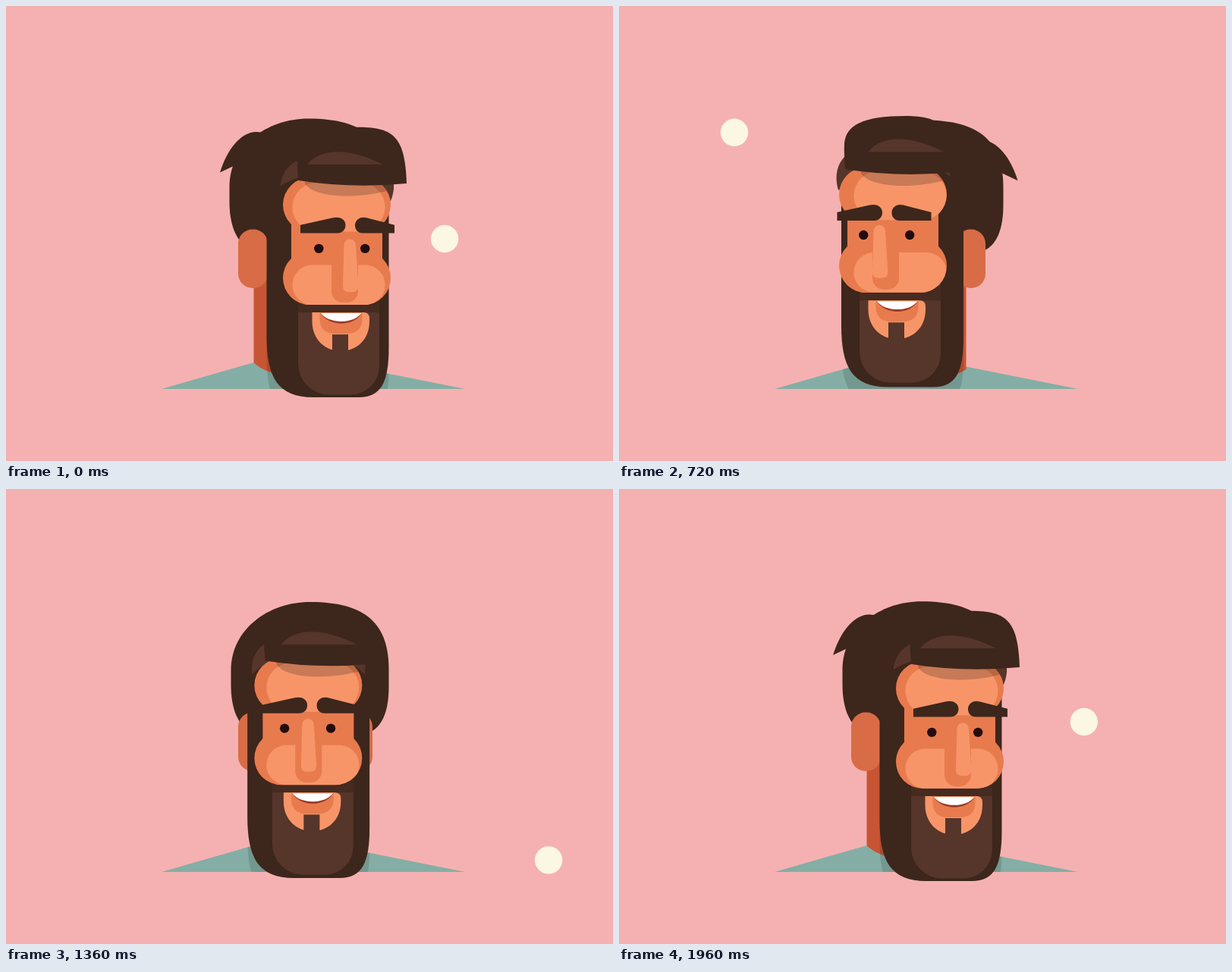
An HTML page with a canvas for the animation above (2 s loop, 800 px wide and 600 px high).

```html
<!DOCTYPE html>
<html lang="en">
<head>
<meta charset="utf-8">
<title>Turning head</title>
<style>
html, body { margin: 0; width: 100%; height: 100%; overflow: hidden; background: #f5b1b1; }
canvas { display: block; width: 100vw; height: 100vh; }
</style>
</head>
<body>
<canvas id="stage" width="800" height="600"></canvas>
<script>
const ctx = document.getElementById('stage').getContext('2d');
const LOOP = 2000, STEP = 40, LAG = 82, WRAP = 235;

const C = {
  bg: '#f5b1b1', shirt: '#84aea5', neck: '#c75534', ear: '#d86c46',
  hair: '#3d261c', hairLight: '#56352a', moustache: '#452b20',
  skin: '#e87b4d', glow: '#f79569', mouth: '#9b3b25', eye: '#230b0e', ball: '#fbf7e3'
};

// Keys are [time, value, bend]; bend delays the start of the segment.
const ballX = [[1163, 152], [1395, 752], [1937, 613.5], [1954, 613.5], [2225, 152]];
const ballY = [[240, 307], [1160, 43.7], [1395, 526.5, 0.3], [1937, 307, 0.3]];
const turnKeys = [[1160, 1], [1395, 0.01], [1937, 0], [1954, 0], [2225, 1]];
const nodKeys = [[240, 0], [1160, -44.2], [1395, 35.5], [1937, 0]];

function track(keys, time) {
  const t = (time - WRAP + LOOP) % LOOP + WRAP;
  if (t <= keys[0][0]) return keys[0][1];
  for (let i = 1; i < keys.length; i++) {
    const [a, from] = keys[i - 1], [b, to, bend = 0] = keys[i];
    if (t < b) {
      const u = (t - a) / (b - a);
      const e = u * u * (3 - 2 * u);
      return from + (to - from) * (e - bend * e * (1 - e));
    }
  }
  return keys[keys.length - 1][1];
}

const fill = (color, path) => { ctx.fillStyle = color; ctx.fill(path); };
const svg = d => new Path2D(d);
function box(x1, y1, x2, y2, r = 0) {
  const p = new Path2D();
  p.roundRect(x1, y1, x2 - x1, y2 - y1, r);
  return p;
}
function disc(x, y, r) {
  const p = new Path2D();
  p.arc(x, y, r, 0, 7);
  return p;
}

const shirt = svg('M205 505 L326.5 470 L457.5 475.5 L605 505 Z');
const neck = svg('M326.5 340 H457.5 V479 C447 487 425 491.5 402 491.5 C365 491.5 338 482 326.5 470 Z');
const ears = [box(306, 294.5, 345, 372, 19), box(444.5, 294.5, 483, 372, 19)];
const tuft = svg('M282 219.5 C291 190 309 166 330 166 Q346 166 354 176 L340 192 Z');
const backHair = svg('M296 238 C296 185 345 148.5 400 148.5 C475 148.5 504 178 504 238 V260 ' +
  'C504 293 495 312 480 320 H322 C303 310 296 285 296 258 Z');
const hairline = svg('M364 256 C359 240 359 212 392 200 L505 215 L511 234 Q512 245 507 257 Z');
const beard = svg('M343.5 266 A80.5 45 0 0 1 504.5 266 V450 C504.5 495 495 516 465 516 H405 ' +
  'C358 516 343.5 490 343.5 435 Z');
const chin = box(385, 375, 492, 512.5, [0, 0, 38, 41]);
const forehead = box(365, 226, 507, 298, 36);
const foreheadGlow = box(377.5, 233, 499.5, 297.3, 32);
const quiffShade = svg('M394 234 C405 253 465 256 512 241 V220 H394 Z');
const face = box(376, 270, 496, 350);
const cheeks = box(365, 323, 507, 394, 35.5);
const cheekGlow = box(377.5, 341.5, 499.5, 394, 26);
const noseShade = box(429, 330, 464, 391, [0, 0, 15, 15]);
const noseGlow = svg('M445.5 315 A7.7 7.7 0 0 1 461 315 L464.3 368 Q464.5 377 456 377 H452 Q443.7 377 444 368 Z');
const goatee = svg('M403.5 404 H471 Q479 404 479 412 V416 C479 440 462 455 441 455 C420 455 403.5 439 403.5 416 Z');
const lip = svg('M413.5 404 H469.5 V412 Q469.5 432 449 432 H434 Q413.5 432 413.5 412 Z');
const mouth = svg('M415 405 H468.5 C464 414 453 418.7 442 418.7 C431 418.7 420 414 415 405 Z');
const teeth = svg('M415 405 H468.5 C463 412.5 453 415.8 442 415.8 C431 415.8 420 412.5 415 405 Z');
const patch = box(430, 433, 451, 457);
const brows = [
  svg('M388 288.7 L431 279.2 C441 277 447.5 282 447.5 289 C447.5 295 443 299.5 437 299.5 H388 Z'),
  svg('M512 288.7 L475 279.2 C467 277 460 282 460 289 C460 295 464 299.5 470 299.5 H512 Z')
];
const quiff = svg('M385.5 230 C384 218 383.5 206 384 196 C386 172 408 159.7 465 159.7 ' +
  'C512 159.7 526 174 528 234 Q455 241 385.5 230 Z');
const quiffLight = svg('M397 209 C414 187 452 186 497 209 Z');

function draw(time) {
  const turn = track(turnKeys, time - LAG);
  const nod = track(nodKeys, time - LAG);

  // Each layer slides by its own share of the turn and the nod.
  function layer(dx, dy, paint) {
    ctx.save();
    ctx.translate(-dx * turn, dy * nod);
    paint();
    ctx.restore();
  }
  const part = (dx, dy, color, path) => layer(dx, dy, () => fill(color, path));

  fill(C.bg, box(0, 0, 800, 600));
  fill(C.shirt, shirt);
  fill(C.neck, neck);

  ctx.save();
  const body = new Path2D(shirt);
  body.addPath(neck);
  ctx.clip(body);
  ctx.translate(0, 28);
  part(50.5, 0.76, 'rgba(0,0,0,.13)', beard);
  ctx.restore();

  ctx.save();
  ctx.translate(403.75, -0.5 * nod + 2 * turn);
  ctx.scale(1 - 2 * turn, 1);
  ctx.translate(-403.75, 0);
  fill(C.hair, tuft);
  ctx.restore();

  ctx.save();
  ctx.translate(-1.5, 0);
  part(-4, -0.12, C.hair, backHair);
  ctx.restore();
  ears.forEach(e => fill(C.ear, e));

  part(75, 0.76, C.hairLight, hairline);
  part(50.5, 0.76, C.hair, beard);
  part(68, 0.89, C.hairLight, chin);
  layer(68, 0.89, () => fill(C.moustache, box(385, 385, 492, 404)));

  part(75, 0.85, C.skin, face);
  part(75, 0.76, C.skin, forehead);
  part(68, 0.85, C.glow, foreheadGlow);
  layer(75, 0.76, () => {
    ctx.clip(forehead);
    fill('rgba(61,38,28,.25)', quiffShade);
  });

  layer(75, 0.9, () => {
    fill(C.skin, cheeks);
    ctx.clip(cheeks);
    ctx.translate(7 * turn, 0.03 * nod);
    fill(C.glow, cheekGlow);
  });
  part(95, 0.97, C.skin, noseShade);
  part(110, 1.03, C.glow, noseGlow);

  layer(90, 1, () => [412.3, 473.2].forEach(x => fill(C.eye, disc(x, 319.7, 6.2))));

  layer(75, 0.89, () => {
    fill(C.glow, goatee);
    fill(C.skin, lip);
    fill(C.mouth, mouth);
    fill('#fff', teeth);
    fill(C.hairLight, patch);
  });

  part(87, 0.835, C.hair, quiff);
  part(68.5, 0.94, C.hairLight, quiffLight);
  layer(100.5, 0.94, () => brows.forEach(b => fill(C.hair, b)));

  fill(C.ball, disc(track(ballX, time), track(ballY, time), 18.2));
}

function tick(now) {
  draw(Math.floor(now % LOOP / STEP) * STEP);
  requestAnimationFrame(tick);
}
draw(0);
requestAnimationFrame(tick);
</script>
</body>
</html>
```
